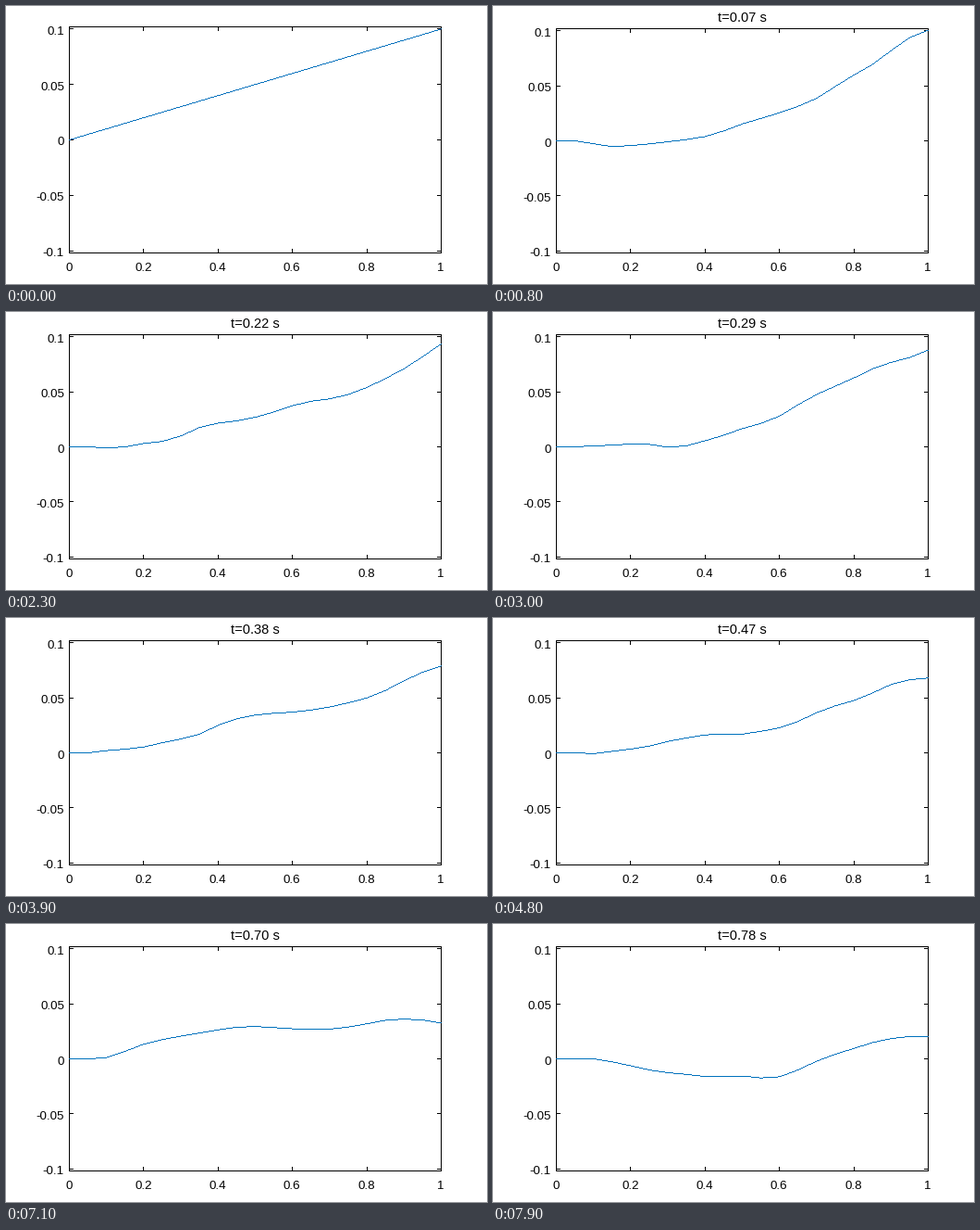
Recreate the animation shown at these times as a matplotlib script. Size 520 by 300 pixels, loop 8 s.

```python
import numpy as np
import matplotlib
matplotlib.rcParams["toolbar"] = "None"
import matplotlib.pyplot as plt
from matplotlib.animation import FuncAnimation
from matplotlib.collections import LineCollection

W, H, DPI = 520, 300, 100
FRAMES, INTERVAL = 80, 100
LEFT, RIGHT, BOTTOM = 68.5, 470.5, 266.5
Y_MAX = 0.102
INK, BLUE = "black", "#0072BD"
PX = 72 / DPI

# Finite-difference beam of unit length and mass, clamped at its first two
# nodes, with a heavy tip mass, released from a straight line.
CELLS = 20
EI = 5.0
TIP_MASS = 5.0
STEP = 0.0004
SLOPE = 0.1

h = 1 / CELLS
nodes = np.linspace(0, 1, CELLS + 1)
start = SLOPE * nodes


def solve_modes():
    """Frequencies and mode contributions of the free nodes."""
    n = CELLS - 1
    bend = np.eye(n) - 2 * np.eye(n, k=-1) + np.eye(n, k=-2)
    stiffness = EI / h ** 3 * bend.T @ bend
    root = np.sqrt(np.r_[np.full(n - 1, h), TIP_MASS])
    values, vectors = np.linalg.eigh(stiffness / np.outer(root, root))
    # frequency shift of the explicit central-difference integrator
    omega = 2 / STEP * np.arcsin(np.sqrt(values) * STEP / 2)
    amplitude = vectors.T @ (root * start[2:])
    return omega, vectors / root[:, None] * amplitude


omega, modes = solve_modes()


def deflection(t):
    return np.r_[0, 0, modes @ np.cos(omega * t)]


def to_x(x):
    return LEFT + (RIGHT - LEFT) * np.asarray(x)


def to_y(y, top):
    mid = (top + BOTTOM) / 2
    return mid - np.asarray(y) / Y_MAX * (BOTTOM - mid)


fig = plt.figure(figsize=(W / DPI, H / DPI), dpi=DPI, facecolor="white")
ax = fig.add_axes([0, 0, 1, 1])
ax.set_xlim(0, W)
ax.set_ylim(H, 0)
ax.axis("off")


def stroke():
    return ax.plot([], [], color=INK, lw=PX, snap=False,
                   solid_capstyle="projecting", solid_joinstyle="miter")[0]


def label(x, y, s, size, ha="center"):
    return ax.text(x, y, s, fontsize=size * PX, family="Liberation Sans",
                   ha=ha, va="baseline", color=INK)


X_TICKS = [0, 0.2, 0.4, 0.6, 0.8, 1]
Y_TICKS = [-0.1, -0.05, 0, 0.05, 0.1]
TICK = 4

curve = LineCollection([], colors=BLUE, linewidths=PX, snap=False,
                       capstyle="butt", zorder=3)
ax.add_collection(curve, autolim=False)
box = stroke()
x_marks = [(stroke(), stroke()) for _ in X_TICKS]
y_marks = [(stroke(), stroke()) for _ in Y_TICKS]
for v in X_TICKS:
    label(to_x(v) - 0.5, 286, f"{v:g}", 13.33)
y_labels = [label(63, 0, f"{v:g}", 13.33, ha="right") for v in Y_TICKS]
title = label(269.8, 17, "", 14.67)


def draw_axes(top):
    box.set_data([LEFT, RIGHT, RIGHT, LEFT, LEFT],
                 [BOTTOM, BOTTOM, top, top, BOTTOM])
    for v, (low, high) in zip(X_TICKS, x_marks):
        x = np.floor(to_x(v)) + 0.5
        low.set_data([x, x], [BOTTOM, BOTTOM - TICK])
        high.set_data([x, x], [top, top + TICK])
    for v, (near, far), text in zip(Y_TICKS, y_marks, y_labels):
        y = to_y(v, top)
        row = np.floor(y) + 0.5
        near.set_data([LEFT, LEFT + TICK], [row, row])
        far.set_data([RIGHT, RIGHT - TICK], [row, row])
        text.set_y(y + 6)


def draw_curve(w, top):
    """Crisp line without smoothing: one pixel in each column."""
    x = np.arange(LEFT, RIGHT + 1)
    y = np.floor(np.interp(x, to_x(nodes), to_y(w, top))) + 0.5
    curve.set_segments(np.stack([np.c_[x - 0.5, y], np.c_[x + 0.5, y]], axis=1))


def update(i):
    t = (i - 1) * 0.01
    top = 24.5 if i else 22.5
    draw_axes(top)
    draw_curve(deflection(t) if i else start, top)
    title.set_text(f"t={t:.2f} s" if i else "")
    return []


anim = FuncAnimation(fig, update, frames=FRAMES, interval=INTERVAL,
                     init_func=lambda: update(0), repeat=True,
                     repeat_delay=0, blit=False)
plt.show()
```
